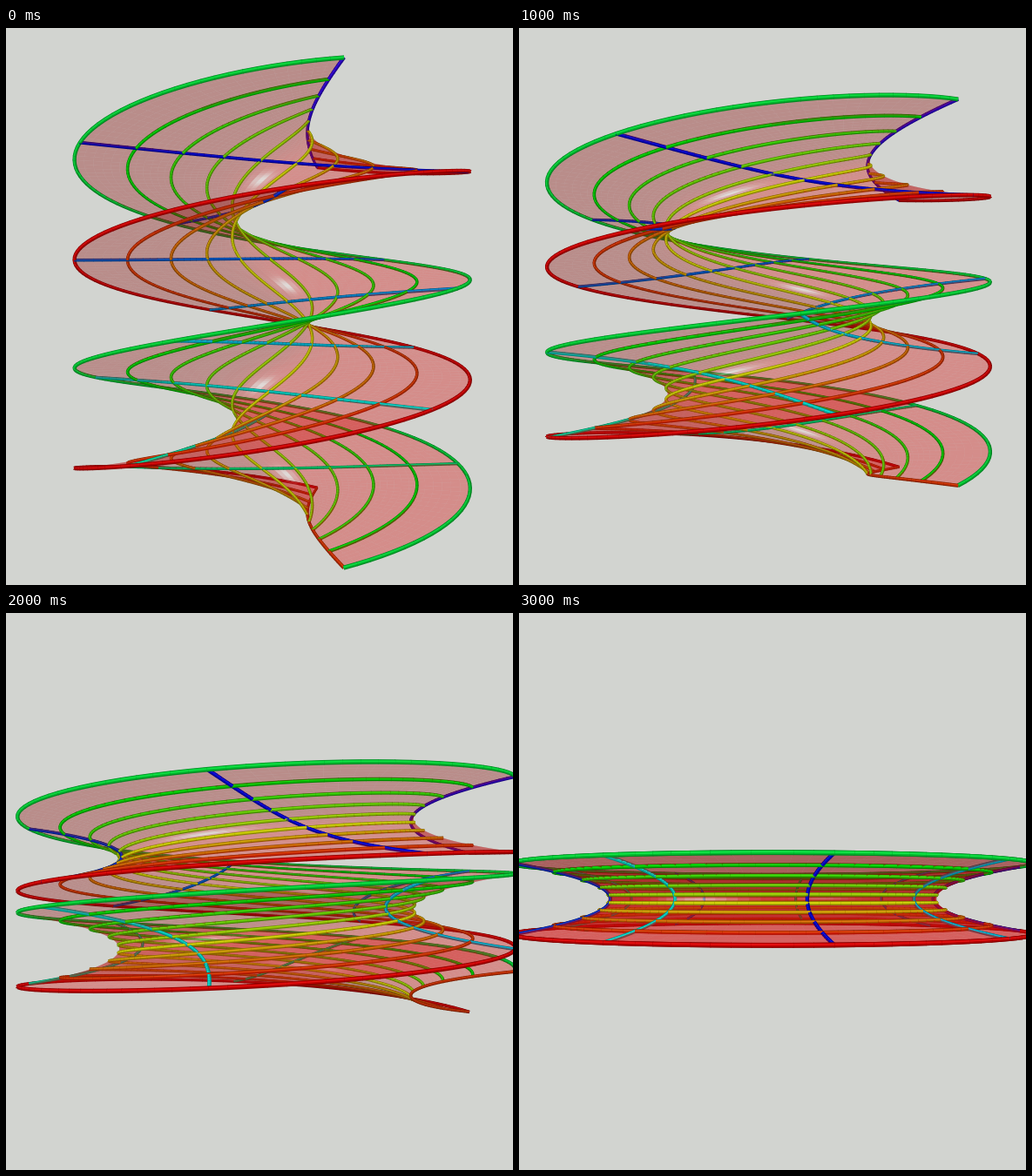
Write a matplotlib script that moves like this. It is 582 by 640 pixels and loops after 3.5 s.

```python
import colorsys

import numpy as np
import matplotlib.pyplot as plt
from matplotlib.animation import FuncAnimation
from matplotlib.collections import PolyCollection

# Helicoid bending into a catenoid, seen through a level perspective camera.
WIDTH, HEIGHT, DPI = 582, 640, 100
STEPS, STEP_MS = 7, 500
CAMERA, FOCAL = 5.0, 922.0
Z_SCALE = 0.2
ALPHA = 0.35
HALFWAY = np.array([-0.36, -0.93, 0.05])
PAN = [(305.7, 337.7), (296, 329.7), (286.5, 332), (287, 337),
       (299, 337), (289, 333), (291, 328.5)]

# The fine grid hits every drawn line, so lines lie on quad borders.
U_GRID = np.linspace(-2 * np.pi, 2 * np.pi, 9 * 24 + 1)
V_GRID = np.linspace(-1, 1, 9 * 6 + 1)
U_LINES, V_LINES = U_GRID[::24], V_GRID[::6]
V_HUES = [15 * i for i in range(10)]
U_HUES = [14] + [138 + 12.7 * j for j in range(1, 10)]
EDGE_RADIUS, LINE_RADIUS = 0.0108, 0.0092

# width share, shift towards the light, brightness, whiteness, depth bias
TUBE_LAYERS = [(1.0, 0.0, 0.70, 0.0, 0.012),
               (0.66, 0.14, 0.95, 0.0, 0.016),
               (0.24, 0.28, 1.06, 0.07, 0.020)]


def surface(u, v, theta):
    s, c = np.sin(theta), np.cos(theta)
    x = c * np.sinh(v) * np.sin(u) + s * np.cosh(v) * np.cos(u)
    y = -c * np.sinh(v) * np.cos(u) + s * np.cosh(v) * np.sin(u)
    z = Z_SCALE * (c * u + s * v)
    return np.stack(np.broadcast_arrays(x, y, z), axis=-1)


def project(p, pan):
    scale = FOCAL / (CAMERA + p[..., 1])
    xy = np.stack([pan[0] + p[..., 0] * scale,
                   pan[1] - p[..., 2] * scale], axis=-1)
    return xy, scale


def cell_mean(a):
    return (a[:-1, :-1] + a[1:, :-1] + a[1:, 1:] + a[:-1, 1:]) / 4


def sheet(theta, pan):
    """Translucent quads of the surface: corners, colours, depths."""
    u, v = np.meshgrid(U_GRID, V_GRID, indexing="ij")
    p = surface(u, v, theta)
    xy, _ = project(p, pan)
    quads = np.stack([xy[:-1, :-1], xy[1:, :-1], xy[1:, 1:], xy[:-1, 1:]],
                     axis=2).reshape(-1, 4, 2)

    mid = cell_mean(p).reshape(-1, 3)
    um, vm = cell_mean(u).ravel(), cell_mean(v).ravel()
    n = np.stack([np.cos(um), np.sin(um), -np.sinh(vm) / Z_SCALE], axis=1)
    n /= np.linalg.norm(n, axis=1, keepdims=True)
    to_eye = np.array([0, -CAMERA, 0]) - mid
    n *= np.where((n * to_eye).sum(1) < 0, -1, 1)[:, None]

    glow = np.clip(n @ HALFWAY, 0, 1)
    red = (178 + 40 * n[:, 2] + 35 * glow ** 4) / 255
    rgb = np.stack([red, np.full_like(red, 0.04), np.full_like(red, 0.04)], 1)
    shine = (glow ** 40)[:, None]
    rgb = np.clip(rgb * (1 - shine) + shine, 0, 1)
    rgba = np.column_stack([rgb, np.full(len(rgb), ALPHA)])
    return quads, rgba, CAMERA + mid[:, 1]


def tube(u, v, theta, pan, hue, radius):
    """Yield the shaded layers of one grid line as short quads."""
    p = surface(u, v, theta)
    xy, scale = project(p, pan)
    a, b = xy[:-1], xy[1:]
    along = b - a
    along = along / (np.linalg.norm(along, axis=1, keepdims=True) + 1e-9)
    side = np.stack([-along[:, 1], along[:, 0]], axis=1)
    side *= np.where(side @ np.array([-0.4, -0.9]) < 0, -1, 1)[:, None]
    half = radius * ((scale[:-1] + scale[1:]) / 2)[:, None]

    mid = (p[:-1] + p[1:]) / 2
    light = 0.97 - 0.1 * mid[:, 1]
    base = np.array(colorsys.hsv_to_rgb(hue / 360, 1, 0.7))
    for share, shift, bright, white, bias in TUBE_LAYERS:
        off = side * half * shift
        w = side * half * share
        a2, b2 = a - 0.3 * along + off, b + 0.3 * along + off
        quads = np.stack([a2 - w, b2 - w, b2 + w, a2 + w], axis=1)
        rgb = np.clip(base * bright * light[:, None] + white, 0, 1)
        rgba = np.column_stack([rgb, np.ones(len(rgb))])
        yield quads, rgba, CAMERA + mid[:, 1] - bias


def scene(step):
    theta = np.pi / 2 * (step + 1) / STEPS
    pan = PAN[step]
    parts = [sheet(theta, pan)]
    for v, hue in zip(V_LINES, V_HUES):
        radius = EDGE_RADIUS if abs(v) > 0.99 else LINE_RADIUS
        parts += tube(U_GRID, v, theta, pan, hue, radius)
    for u, hue in zip(U_LINES, U_HUES):
        parts += tube(u, V_GRID, theta, pan, hue, LINE_RADIUS)

    quads, colors, depth = (np.concatenate(g) for g in zip(*parts))
    order = np.argsort(-depth, kind="stable")
    return quads[order], colors[order]


fig = plt.figure(figsize=(WIDTH / DPI, HEIGHT / DPI), dpi=DPI,
                 facecolor="#d2d4d0")
ax = fig.add_axes([0, 0, 1, 1])
ax.set_xlim(0, WIDTH)
ax.set_ylim(HEIGHT, 0)
ax.axis("off")

mesh = PolyCollection([], edgecolors="none", linewidths=0, antialiased=True)
mesh.set_snap(False)
ax.add_collection(mesh, autolim=False)


def draw(step):
    quads, colors = scene(step)
    mesh.set_verts(quads)
    mesh.set_facecolor(colors)
    return (mesh,)


anim = FuncAnimation(fig, draw, frames=STEPS, interval=STEP_MS,
                     repeat=True, repeat_delay=0, blit=False)
plt.show()
```
